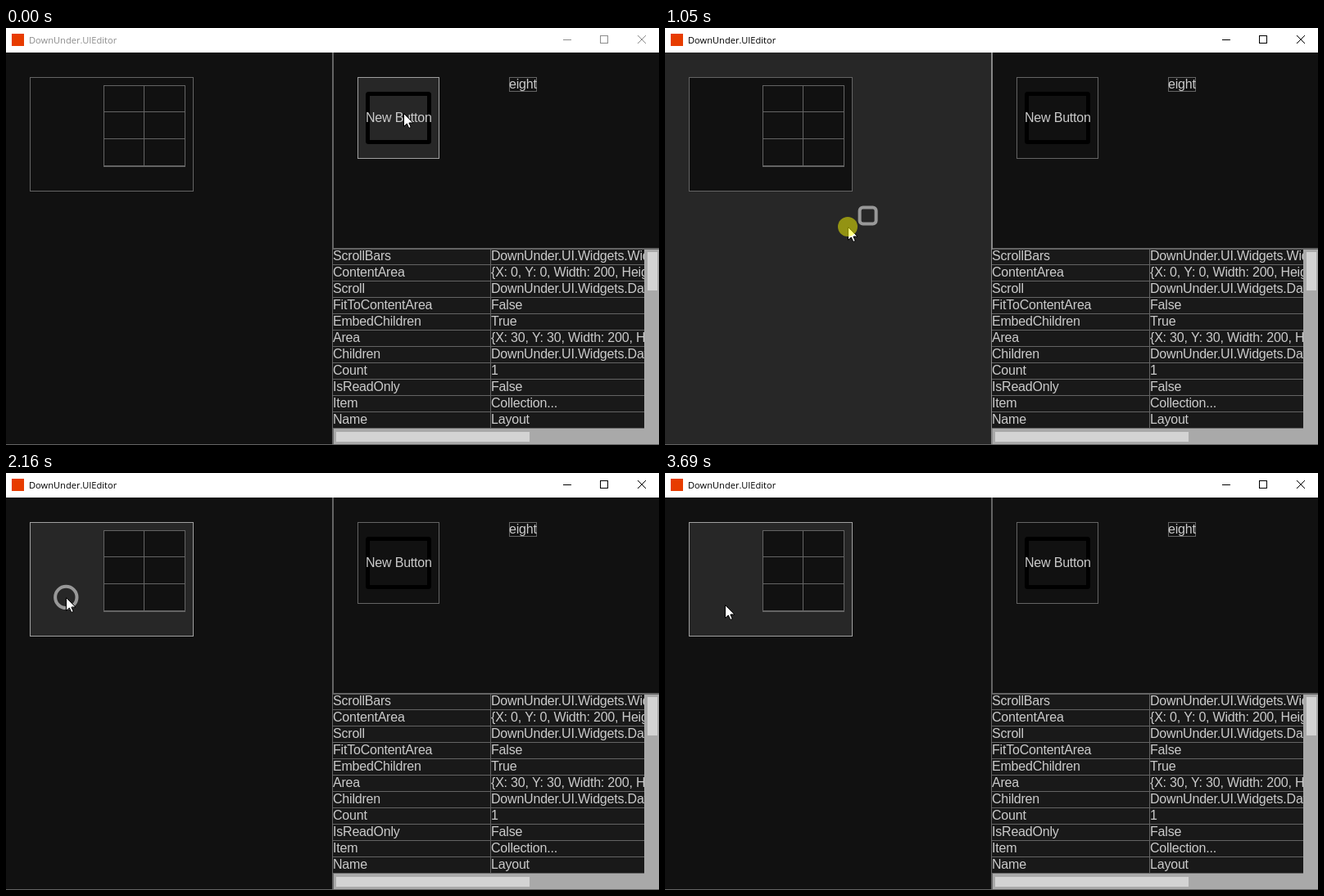
An HTML page with a canvas for the animation above (4110 ms loop, 797x510 px).

```html
<!DOCTYPE html>
<html lang="en">
<head>
<meta charset="utf-8">
<title>DownUnder.UIEditor</title>
<style>
html, body { margin: 0; width: 100%; height: 100%; overflow: hidden; background: #111; }
canvas { display: block; }
</style>
</head>
<body>
<canvas id="stage" width="797" height="510"></canvas>
<script>
const LOOP = 4110;
const ctx = document.getElementById('stage').getContext('2d');
const LINE = '#646464', DARK = '#111', TEXT = '#cbcbcb';

const properties = [
  ['ScrollBars', 'DownUnder.UI.Widgets.Widget'],
  ['ContentArea', '{X: 0, Y: 0, Width: 200, Height: 140}'],
  ['Scroll', 'DownUnder.UI.Widgets.DataTypes'],
  ['FitToContentArea', 'False'],
  ['EmbedChildren', 'True'],
  ['Area', '{X: 30, Y: 30, Width: 200, Height: 140}'],
  ['Children', 'DownUnder.UI.Widgets.DataTypes'],
  ['Count', '1'],
  ['IsReadOnly', 'False'],
  ['Item', 'Collection...'],
  ['Name', 'Layout']
];

// Pointer path: time, x, y
const path = [
  [0, 485, 104], [150, 485, 104], [600, 448, 117], [690, 448, 117],
  [1050, 223, 243], [1200, 207, 246], [1650, 106, 149], [1750, 99, 148],
  [2100, 73, 152], [2970, 73, 152], [3260, 73, 161], [LOOP, 73, 161]
];

const mix = (a, b, p) => a + (b - a) * p;
const ramp = (t, from, to) => Math.min(1, Math.max(0, (t - from) / (to - from)));
const easeOut = p => 1 - (1 - p) ** 3;
const gray = (a, b, p) => {
  const v = Math.round(mix(a, b, p));
  return `rgb(${v},${v},${v})`;
};
const fillHover = p => gray(17, 39, p);
const lineHover = p => gray(100, 160, p);

function slope(i, axis) {
  if (i < 1 || i > path.length - 2) return 0;
  const before = path[i][axis] - path[i - 1][axis];
  const after = path[i + 1][axis] - path[i][axis];
  if (before * after <= 0) return 0;
  return (before + after) / (path[i + 1][0] - path[i - 1][0]);
}

function pointer(t) {
  let i = 0;
  while (i < path.length - 2 && t >= path[i + 1][0]) i++;
  const span = path[i + 1][0] - path[i][0];
  const p = ramp(t, path[i][0], path[i + 1][0]);
  return [1, 2].map(axis => {
    const s = p * p * (3 - 2 * p);
    const bend = p * (1 - p) * span * ((1 - p) * slope(i, axis) - p * slope(i + 1, axis));
    return mix(path[i][axis], path[i + 1][axis], s) + bend;
  });
}

// The drag outline trails the pointer with exponential smoothing
function trail(t) {
  let x = 0, y = 0, total = 0;
  for (let age = 0; age <= 300; age += 10) {
    const weight = Math.exp(-age / 45);
    const [px, py] = pointer(Math.max(0, t - age));
    x += px * weight;
    y += py * weight;
    total += weight;
  }
  return [x / total, y / total];
}

function rect(x, y, w, h, color) {
  ctx.fillStyle = color;
  ctx.fillRect(x, y, w, h);
}

function frame(x, y, w, h, color) {
  ctx.strokeStyle = color;
  ctx.lineWidth = 1;
  ctx.strokeRect(x + .5, y + .5, w - 1, h - 1);
}

function write(text, x, y) {
  ctx.font = '16px "Liberation Sans", Arial, sans-serif';
  ctx.letterSpacing = '-0.2px';
  ctx.fillStyle = TEXT;
  ctx.fillText(text, x, y);
}

function titleBar(active) {
  const ink = active ? '#000' : '#8c8c8c';
  rect(0, 0, 797, 30, '#fff');
  rect(7, 7, 15, 15, '#e73c00');
  ctx.font = '11.1px "Open Sans", sans-serif';
  ctx.letterSpacing = '0px';
  ctx.fillStyle = ink;
  ctx.fillText('DownUnder.UIEditor', 28, 19);
  rect(680, 14, 10, 1, ink);
  frame(725, 9, 10, 10, ink);
  ctx.beginPath();
  ctx.moveTo(771, 9); ctx.lineTo(781, 19);
  ctx.moveTo(781, 9); ctx.lineTo(771, 19);
  ctx.stroke();
}

function designer(panel, layout) {
  rect(0, 30, 398, 480, fillHover(panel));
  rect(398, 30, 2, 480, lineHover(panel * .6));
  rect(29, 60, 200, 140, fillHover(layout));
  frame(29, 60, 200, 140, lineHover(layout));
  rect(119, 70, 100, 100, DARK);
  frame(119, 70, 100, 100, LINE);
  rect(168, 70, 1, 100, LINE);
  for (const y of [102, 135, 168]) rect(119, y, 100, 1, LINE);
}

function palette(hover) {
  rect(429, 60, 100, 100, fillHover(hover));
  frame(429, 60, 100, 100, lineHover(hover));
  ctx.strokeStyle = '#000';
  ctx.lineWidth = 5;
  ctx.beginPath();
  ctx.roundRect(441.5, 80.5, 75, 59, 1);
  ctx.stroke();
  write('New Button', 439, 115);
  frame(614, 60, 34, 18, LINE);
  write('eight', 614, 74);
}

function propertyGrid() {
  rect(400, 269, 397, 2, LINE);
  ctx.save();
  ctx.beginPath();
  ctx.rect(399, 271, 380, 219);
  ctx.clip();
  rect(399, 271, 380, 219, '#191919');
  properties.forEach(([name, value], i) => {
    const y = 270 + 20 * i;
    rect(399, y + 19, 380, 1, LINE);
    write(name, 399, y + 14);
    write(value, 592, y + 14);
  });
  rect(591, 271, 1, 219, LINE);
  ctx.restore();
  rect(779, 271, 18, 238, '#a9a9a9');
  rect(400, 490, 397, 19, '#a9a9a9');
  rect(783, 274, 12, 47, '#d3d3d3');
  rect(403, 494, 236, 12, '#d3d3d3');
  rect(0, 509, 797, 1, LINE);
}

function dragOutline(t) {
  if (t < 620 || t > 3690) return;
  const [x, y] = t < 2250 ? trail(t) : [73, 152];
  const shrink = easeOut(ramp(t, 620, 980));
  const grow = ramp(t, 2110, 2270);
  const w = mix(mix(88, 24, shrink), 44, grow);
  const h = mix(mix(76, 24, shrink), 44, grow);
  const round = mix(mix(.5, 1, ramp(t, 1400, 1580)), .45, ramp(t, 2170, 2290));
  const radius = Math.min(12, Math.min(w, h) / 2) * round;
  const corner = round > .9 ? Math.min(w, h) / 2 * round : Math.max(radius, w * .22);
  ctx.globalAlpha = ramp(t, 620, 880) * (1 - ramp(t, 2250, 3690)) ** 2;
  ctx.strokeStyle = '#989898';
  ctx.lineWidth = 4;
  ctx.beginPath();
  ctx.roundRect(x - w / 2 + 2, y - h / 2 + 2, w - 4, h - 4, Math.max(0, corner - 2));
  ctx.stroke();
  ctx.globalAlpha = 1;
}

const arrow = new Path2D('M.5.5V16.5L4.3 13 6.8 18.5 9.3 17.4 6.9 12H11.9Z');

function drawPointer(x, y, pressed) {
  ctx.save();
  ctx.translate(Math.round(x), Math.round(y));
  ctx.fillStyle = '#fff';
  ctx.fill(arrow);
  ctx.strokeStyle = '#000';
  ctx.lineWidth = 1;
  ctx.stroke(arrow);
  if (pressed) {
    ctx.fillStyle = 'rgba(255,255,0,.5)';
    ctx.beginPath();
    ctx.arc(0, 0, 12, 0, 7);
    ctx.fill();
  }
  ctx.restore();
}

function draw(t) {
  rect(0, 0, 797, 510, DARK);
  titleBar(t >= 560);
  designer(ramp(t, 790, 1040) * (1 - ramp(t, 1430, 1750)), ramp(t, 1430, 1870));
  palette(1 - ramp(t, 760, 1030));
  propertyGrid();
  dragOutline(t);
  drawPointer(...pointer(t), t >= 560 && t < 2110);
}

const start = performance.now();
function tick() {
  draw((performance.now() - start) % LOOP);
  requestAnimationFrame(tick);
}
tick();
</script>
</body>
</html>
```
